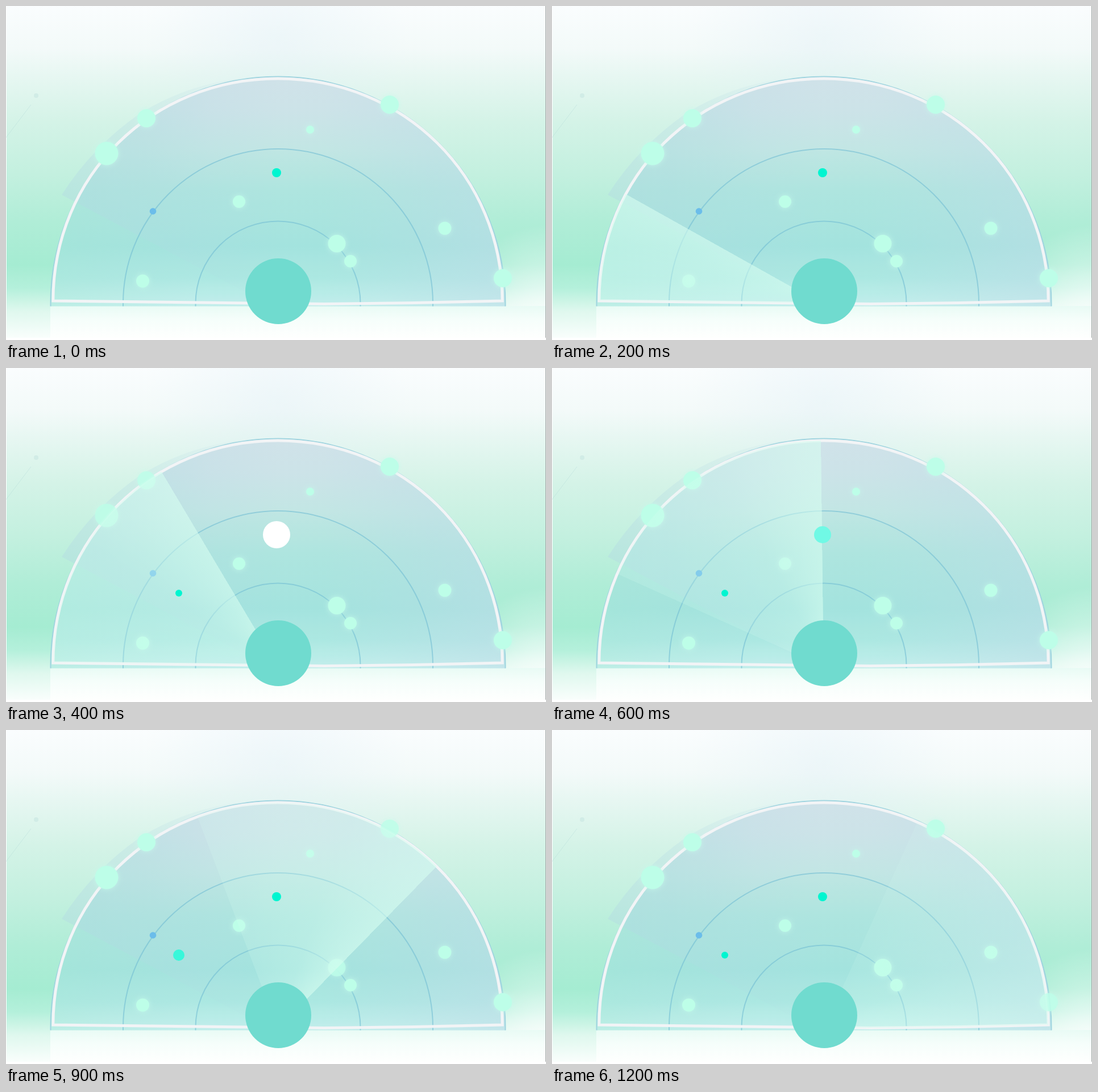
Write an HTML page with a canvas that moves like this. It is 950 px wide and 589 px high and loops after 1300 ms.

```html
<!DOCTYPE html>
<html lang="en">
<head>
<meta charset="utf-8">
<title>Radar sweep</title>
<style>
  html, body { margin: 0; width: 100%; height: 100%; overflow: hidden; background: #fff; }
  canvas { display: block; }
</style>
</head>
<body>
<canvas id="stage" width="950" height="589"></canvas>
<script>
const ctx = document.getElementById('stage').getContext('2d');
const CX = 478.5, CY = 524.5, RAD = Math.PI / 180;
const STEP = 100, STEPS = 13, TAIL = 65;

// x, y, radius
const dots = [
  [177, 260, 20.5], [247, 198, 16], [675, 174, 16], [874, 480, 16], [535, 218, 7],
  [410, 345, 11], [582, 419, 15.5], [606, 450, 11], [772, 392, 11.5], [240.5, 485, 11.5]
];
const pulses = [
  { x: 476, y: 294, rest: 8, peak: 24, from: 0, start: 3, radii: [16, 24, 19, 15, 11] },
  { x: 304, y: 397, rest: 6, peak: 24, from: 3, start: 7, radii: [22, 16, 10] }
];

function fade(gradient, stops) {
  stops.forEach(([at, color]) => gradient.addColorStop(at, color));
  return gradient;
}
const vertical = (y0, y1, stops) => fade(ctx.createLinearGradient(0, y0, 0, y1), stops);
const horizontal = (x0, x1, stops) => fade(ctx.createLinearGradient(x0, 0, x1, 0), stops);
const radial = (x, y, r, stops) => fade(ctx.createRadialGradient(x, y, 0, x, y, r), stops);

function disc(x, y, r, color) {
  ctx.fillStyle = color;
  ctx.beginPath();
  ctx.arc(x, y, r, 0, 2 * Math.PI);
  ctx.fill();
}

// Half circle whose sides run straight down to the base line
function dome(r, base = 529.5) {
  ctx.beginPath();
  ctx.moveTo(CX - r, base);
  ctx.arc(CX, CY, r, Math.PI, 2 * Math.PI);
  ctx.lineTo(CX + r, base);
}

// Slightly bulging half circle with a sagging base
function frame() {
  const left = 82.8, right = 873.2, top = 128, base = 520, bend = .561;
  const pull = (base - top) * bend, reach = (right - left) / 2 * bend;
  ctx.beginPath();
  ctx.moveTo(left, base);
  ctx.bezierCurveTo(left, base - pull, 478 - reach, top, 478, top);
  ctx.bezierCurveTo(478 + reach, top, right, base - pull, right, base);
  ctx.quadraticCurveTo(720, 524, 560, 525.5);
  ctx.quadraticCurveTo(300, 523, left, base);
  ctx.closePath();
}

const sky = vertical(0, 585, [
  [0, '#fafdfe'], [.13, '#f3faf9'], [.21, '#e7f7f2'], [.35, '#d4f3e7'], [.51, '#c3f0df'],
  [.65, '#b0edd7'], [.78, '#a5ecd2'], [.85, '#b4f0db'], [.92, '#dff8ee'], [1, '#f9fefc']
]);
const halo = radial(478, 60, 230, [[0, 'rgba(218,236,245,.3)'], [1, 'rgba(218,236,245,0)']]);
const shine = radial(960, 575, 190, [
  [0, 'rgba(255,255,255,.95)'], [.4, 'rgba(255,255,255,.6)'], [1, 'rgba(255,255,255,0)']
]);
const floor = vertical(529, 585, [[0, '#e9fbf5'], [.45, '#f6fefb'], [1, '#fefffe']]);
const glass = vertical(124, 529, [
  [0, '#d0e2e9'], [.15, '#cce3e8'], [.32, '#c2e6e4'], [.5, '#b0e5df'],
  [.74, '#a5e3de'], [.88, '#b0e8e4'], [1, '#c9f0ee']
]);
const tint = horizontal(78, 879, [
  [0, 'rgba(160,234,208,.3)'], [.35, 'rgba(160,225,215,0)'],
  [.6, 'rgba(190,220,232,0)'], [1, 'rgba(192,220,232,.5)']
]);
const ghost = horizontal(98, 478, [[0, 'rgba(178,215,228,.38)'], [1, 'rgba(178,215,228,0)']]);

function drawBackdrop() {
  ctx.fillStyle = '#fff';
  ctx.fillRect(0, 0, 950, 589);
  for (const paint of [sky, halo, shine]) {
    ctx.fillStyle = paint;
    ctx.fillRect(1, 0, 948, 585);
  }
  ctx.fillStyle = floor;
  ctx.fillRect(78, 529, 871, 56);
  ctx.fillStyle = '#a3a8a7';
  ctx.fillRect(949, 0, 1, 585);

  disc(53, 158, 4, 'rgba(180,215,215,.3)');
  ctx.strokeStyle = 'rgba(170,210,210,.35)';
  ctx.lineWidth = 1;
  ctx.beginPath();
  ctx.moveTo(0, 232);
  ctx.lineTo(44, 174);
  ctx.stroke();
}

function drawDome() {
  dome(400);
  ctx.fillStyle = glass;
  ctx.fill();
  ctx.fillStyle = tint;
  ctx.fill();

  ctx.fillStyle = ghost;
  ctx.beginPath();
  ctx.moveTo(478, 535);
  ctx.lineTo(98, 333);
  ctx.quadraticCurveTo(153, 247, 235, 190);
  ctx.quadraticCurveTo(340, 124, 478, 123);
  ctx.fill();

  for (const r of [272.5, 145]) {
    dome(r);
    ctx.fillStyle = 'rgba(150,222,216,.08)';
    ctx.fill();
    ctx.strokeStyle = 'rgba(115,190,212,.6)';
    ctx.lineWidth = 2;
    ctx.stroke();
  }
  dome(400);
  ctx.strokeStyle = '#9fd4df';
  ctx.stroke();

  frame();
  ctx.strokeStyle = '#f2f4f6';
  ctx.lineWidth = 5;
  ctx.stroke();
}

function drawDots(lead) {
  for (const [x, y, r] of dots) {
    const angle = Math.atan2(527 - y, 478 - x) / RAD;
    const lag = lead - angle;
    ctx.globalAlpha = lead > 0 && lag > -1 && lag < 20 ? .8 : 1;
    ctx.shadowColor = 'rgba(198,250,235,.8)';
    ctx.shadowBlur = 10;
    disc(x, y, r, '#bdfee8');
  }
  ctx.globalAlpha = 1;
  ctx.shadowBlur = 0;
  disc(258.5, 362, 5.8, '#6bbdea');
}

function drawSweep(lead, strength) {
  const color = alpha => `rgba(214,253,240,${alpha * strength})`;
  const span = TAIL / 360, start = Math.PI + (lead - TAIL) * RAD;
  ctx.save();
  frame();
  ctx.clip();
  ctx.fillStyle = fade(ctx.createConicGradient(start, 478, 527), [
    [0, color(.19)], [span * .6, color(.33)], [span, color(.62)], [span, color(0)], [1, color(0)]
  ]);
  ctx.beginPath();
  ctx.moveTo(478, 527);
  ctx.arc(478, 527, 420, start, Math.PI + lead * RAD);
  ctx.fill();
  ctx.restore();
}

function drawPulses(step) {
  for (const { x, y, rest, peak, from, start, radii } of pulses) {
    if (step < from) continue;
    const r = radii[step - start] ?? rest;
    const mix = (r - rest) / (peak - rest);
    const blend = c => Math.round(c + (255 - c) * mix);
    disc(x, y, r, `rgb(${blend(0)},${blend(245)},${blend(208)})`);
  }
}

function draw(now) {
  const step = Math.floor(now / STEP) % STEPS;
  const lead = step ? step * 15 - .7 : 0;
  drawBackdrop();
  drawDome();
  drawDots(lead);
  if (step) drawSweep(lead, step === STEPS - 1 ? .65 : 1);
  drawPulses(step);
  disc(479, 503, 58, '#70dbcf');
}

const begin = performance.now();
function tick() {
  draw(performance.now() - begin);
  requestAnimationFrame(tick);
}
tick();
</script>
</body>
</html>
```
